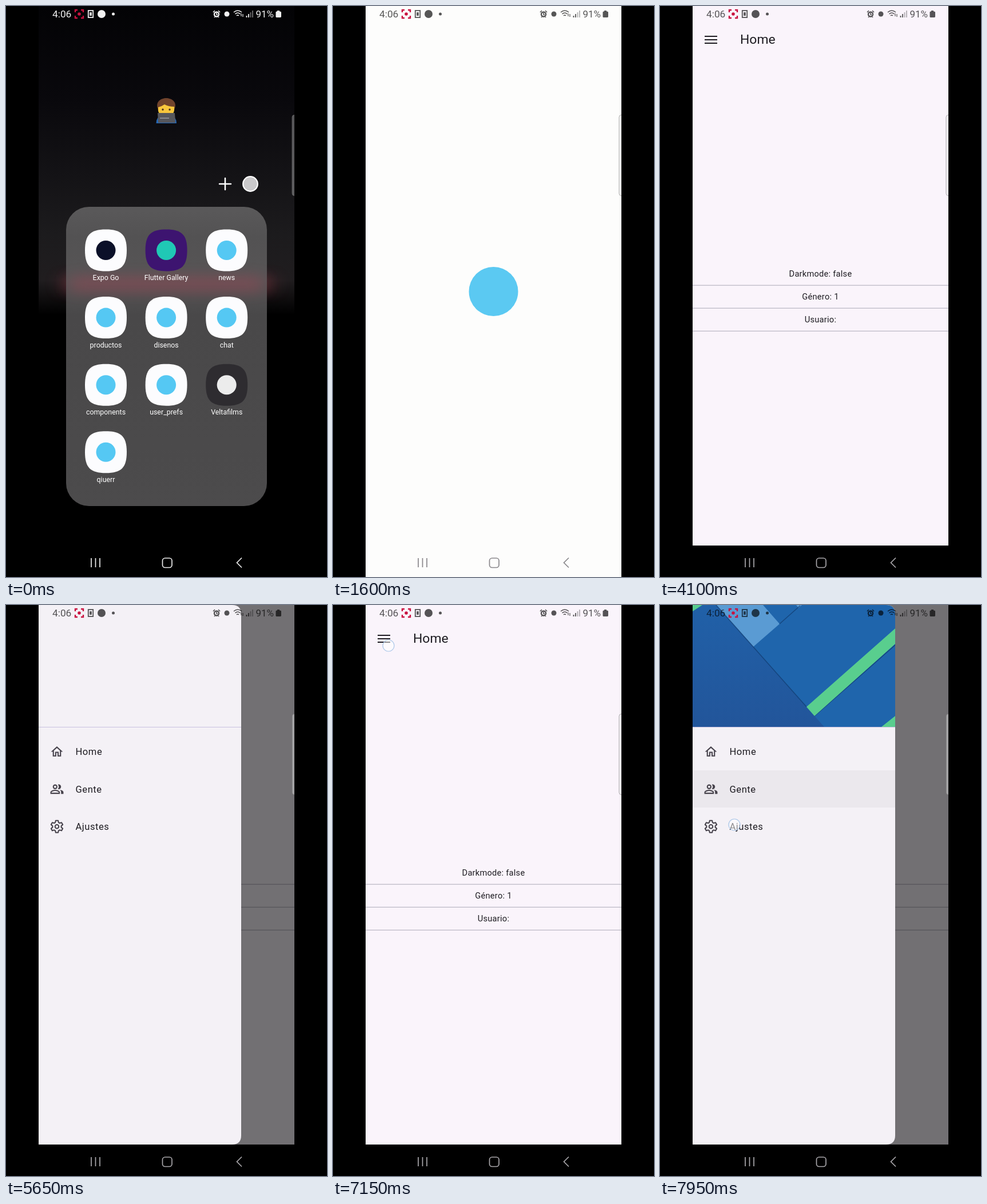
Animation, 561 px wide and 998 px high, one loop 8000 ms. Source, as an HTML page:

```html
<!DOCTYPE html>
<html lang="es">
<head>
<meta charset="utf-8">
<title>App preferences demo</title>
<style>
html, body { margin: 0; width: 100%; height: 100%; overflow: hidden; background: #000; }
svg { display: block; width: 561px; height: 998px; font-family: Roboto, "Noto Sans", sans-serif; }
.label { font-size: 12.4px; fill: #fff; text-anchor: middle; }
.body { font-size: 14.6px; letter-spacing: .26px; fill: #1e1c22; text-anchor: middle; }
.item { font-size: 16.6px; letter-spacing: .52px; fill: #1e1c22; }
.line { fill: none; stroke: currentColor; }
</style>
</head>
<body>
<svg viewBox="0 0 561 998">
  <defs>
    <clipPath id="phone"><rect x="57" width="447" height="998"/></clipPath>
    <clipPath id="header"><path d="M57 0H395Q411 0 411 16V213H57Z"/></clipPath>
    <filter id="soft" x="-20%" y="-150%" width="140%" height="400%">
      <feGaussianBlur stdDeviation="14 10"/>
    </filter>
    <linearGradient id="wall" x2="0" y2="1">
      <stop offset="0" stop-color="#030305"/>
      <stop offset=".16" stop-color="#09080c"/>
      <stop offset=".3" stop-color="#141316"/>
      <stop offset=".4" stop-color="#1c1b1d"/>
      <stop offset=".48" stop-color="#201d1f"/>
      <stop offset=".54" stop-color="#000"/>
    </linearGradient>
    <linearGradient id="panel" x2="0" y2="1">
      <stop offset="0" stop-color="#5a595a"/>
      <stop offset=".1" stop-color="#535253"/>
      <stop offset=".25" stop-color="#575556"/>
      <stop offset=".36" stop-color="#494849"/>
      <stop offset="1" stop-color="#4c4b4c"/>
    </linearGradient>
    <linearGradient id="blue" x2="0" y2="1">
      <stop offset="0" stop-color="#2063ab"/>
      <stop offset="1" stop-color="#22559a"/>
    </linearGradient>
    <path id="tile" d="M-36.5 0C-36.5-27-27-36.5 0-36.5S36.5-27 36.5 0 27 36.5 0 36.5-36.5 27-36.5 0Z"/>
  </defs>
  <g clip-path="url(#phone)">
    <g id="folder">
      <rect x="57" width="447" height="998" fill="url(#wall)"/>
      <rect x="95" y="470" width="375" height="32" fill="#8a3040" opacity=".3" filter="url(#soft)"/>
      <g transform="translate(280 183)">
        <path d="M-17.500 22Q-17.500 11-9 9H9Q18 11 18 22Z" fill="#2468b8"/>
        <path d="M-15-4C-19-16-9-22 0-22S19-16 15-4Z" fill="#70432c"/>
        <path d="M-14-6Q-7-8-3-11 4-7 14-7 16 9 0 11-16 9-14-6Z" fill="#f8c63c"/>
        <circle cx="-6" cy="-2" r="1.700" fill="#4a3020"/>
        <circle cx="6" cy="-2" r="1.700" fill="#4a3020"/>
        <path d="M-15 4H15L16 21H-14Z" fill="#56575c"/>
        <path d="M-11 13H5" stroke="#9a9ba0" stroke-width="1.500"/>
      </g>
      <path d="M383 301V321M373 311H393" stroke="#fff" stroke-width="2.500" stroke-linecap="round"/>
      <circle cx="427" cy="311" r="12.800" fill="#cac9cb" stroke="#fff" stroke-width="2.200"/>
      <rect x="105" y="351" width="351" height="523" rx="40" fill="url(#panel)"/>
      <rect x="112" y="470" width="337" height="32" fill="#9a4452" opacity=".42" filter="url(#soft)"/>
      <g id="apps"></g>
    </g>
    <g id="splash">
      <rect id="sheet" fill="#fdfdfc"/>
      <circle id="mark" fill="#5bc9f2"/>
    </g>
    <g id="home">
      <rect x="57" width="447" height="998" fill="#faf4fb"/>
      <path d="M78 53H100M78 59H100M78 65H100" stroke="#1e1c22" stroke-width="2.200"/>
      <text x="140" y="66" font-size="22.900" fill="#1e1c22">Home</text>
      <g id="rows"></g>
      <rect id="scrim" x="57" width="447" height="943"/>
      <g id="drawer">
        <path d="M57 0H395Q411 0 411 16V927Q411 943 395 943H57Z" fill="#f4f1f6"/>
        <path d="M57 213.500H411" stroke="#c8c0e0"/>
        <g id="picture" clip-path="url(#header)">
          <rect x="57" width="354" height="213" fill="#1f65ac"/>
          <path d="M57-47L98 0 270 194 287 213H57Z" fill="url(#blue)"/>
          <path d="M98 0H180L209 33 163 73Z" fill="#5a9bd3"/>
          <path d="M238 0H248L242 5Z" fill="#5a9bd3"/>
          <path d="M98 0L256 178M209 33L245 1M270 194L412 69" fill="none" stroke="#123e73" stroke-opacity=".75" stroke-width="1.600"/>
          <path d="M256 178L411 41V68L270 194ZM387 213L411 194V213ZM57 0H74L57 11Z" fill="#59ce8e"/>
        </g>
        <rect id="pressed" x="57" y="289" width="354" height="65" fill="#ebe8ed"/>
        <g id="items" color="#48444d"></g>
      </g>
      <rect x="57" y="943" width="447" height="55"/>
    </g>
    <rect id="handle" x="500" y="190.500" width="14" height="141" rx="4" fill="#fff" stroke="#777" stroke-opacity=".6"/>
    <g id="status" fill="currentColor">
      <text x="81" y="20" font-size="17.300">4:06</text>
      <g stroke="#c9123f" stroke-width="2.400" fill="none">
        <path d="M121 11V7H125M131 7H135V11M135 17V21H131M125 21H121V17"/>
      </g>
      <circle cx="128" cy="14" r="2.800" fill="#c9123f"/>
      <rect x="143.800" y="8" width="8.400" height="12" class="line" stroke-width="1.800"/>
      <rect x="146.200" y="11" width="3.600" height="6"/>
      <circle cx="167" cy="14" r="7"/>
      <circle cx="187.500" cy="14" r="2.500"/>
      <circle cx="368" cy="14.500" r="4" class="line" stroke-width="2.400"/>
      <path d="M362 11L365 8M374 11L371 8M364 20L365 19M372 20L371 19M368 12V15H370" class="line" stroke-width="1.600"/>
      <circle cx="386" cy="14" r="4.500"/>
      <path d="M398 11Q405 5 412 11M400.500 14Q405 10 409.500 14M403 17Q405 15 407 17" class="line" stroke-width="1.600"/>
      <path d="M411 18V13M414 14V19" class="line" stroke-width="1.200"/>
      <path d="M420.500 20V17M424 20V14" class="line" stroke-width="1.800"/>
      <path d="M427.500 20V11M431 20V8" class="line" stroke-width="1.800" opacity=".45"/>
      <text x="436.500" y="20" font-size="17">91%</text>
      <path d="M474 8H478V9.500H479Q481 9.500 481 11V18.500Q481 20 479 20H473Q471.500 20 471.500 18.500V11Q471.500 9.500 473 9.500H474Z"/>
    </g>
    <g id="chip">
      <circle r="11" fill="#58c563"/>
      <rect x="-2.200" y="-6.500" width="4.400" height="8.500" rx="2.200" fill="#fff"/>
      <path d="M-4.500-1Q-4.500 4 0 4T4.500-1M0 4V7" fill="none" stroke="#fff" stroke-width="1.300"/>
    </g>
    <g id="nav" class="line" stroke-width="1.700">
      <path d="M149 965V981M156.500 965V981M164 965V981"/>
      <rect x="273.500" y="965" width="16.500" height="16.500" rx="4.500"/>
      <path d="M412 964.500L403.500 973 412 981.500"/>
    </g>
    <circle id="touch" r="10" fill="#fff" fill-opacity=".5" stroke="#a9c6e8" stroke-width="1.200"/>
  </g>
</svg>
<script>
const LOOP = 8000, STEP = 50;
const $ = id => document.getElementById(id);
const set = (id, attrs) => {
  for (const k in attrs) $(id).setAttribute(k, attrs[k]);
};
const show = (id, on) => set(id, { visibility: on ? 'visible' : 'hidden' });
const mix = (a, b, p) => a + (b - a) * p;
const ramp = (t, from, to) => Math.min(1, Math.max(0, (t - from) / (to - from)));
const easeOut = p => 1 - (1 - p) ** 3;
const easeInOut = p => p * p * (3 - 2 * p);

const SKY = '#55c8f3';
const apps = [
  ['Expo Go', '#0b1029'], ['Flutter Gallery', '#20c8b5', '#3d1470'], ['news', SKY],
  ['productos', SKY], ['disenos', SKY], ['chat', SKY],
  ['components', SKY], ['user_prefs', SKY], ['Veltafilms', '#ececec', '#2e2c30'],
  ['qiuerr', SKY]
];
$('apps').innerHTML = apps.map(([name, color, tile = '#fcfcfe'], i) => {
  const x = 174.5 + i % 3 * 105.6, y = 427 + Math.floor(i / 3) * 117.6;
  return `<g transform="translate(${x} ${y})"><use href="#tile" fill="${tile}"/>
    <circle r="17" fill="${color}"/><text class="label" y="52">${name}</text></g>`;
}).join('');

$('rows').innerHTML = ['Darkmode: false', 'Género: 1', 'Usuario:'].map((text, i) => {
  const y = 473 + i * 40;
  return `<text class="body" x="280.5" y="${y}">${text}</text>
    <path d="M57 ${y + 15.3}H504" stroke="#c5c2cd" stroke-width="1.4"/>`;
}).join('');

function gear() {
  const points = [];
  for (let i = 0; i < 6; i++) {
    for (const [turn, r] of [[-.38, 7.4], [-.2, 10.3], [.2, 10.3], [.38, 7.4]]) {
      const a = i * Math.PI / 3 + turn;
      points.push([12 + r * Math.sin(a), 12 - r * Math.cos(a)].map(v => v.toFixed(2)));
    }
  }
  return `<g class="line" stroke-width="2" stroke-linejoin="round">
    <polygon points="${points.join(' ')}"/><circle cx="12" cy="12" r="3.1"/></g>`;
}
const house = '<path d="M12 5.69l5 4.5V18h-2v-6H9v6H7v-7.81l5-4.5M12 3L2 12h3v8h6v-6h2v6h6v-8h3z"/>';
const people = `<path d="M16.67 13.13C18.04 14.06 19 15.32 19 17v3h4v-3c0-2.18-3.57-3.47-6.33-3.87z
  M15 12a4 4 0 0 0 0-8c-.47 0-.91.1-1.33.24a6 6 0 0 1 0 7.52c.42.14.86.24 1.33.24z"/>
  <g class="line" stroke-width="2"><circle cx="9" cy="8" r="3"/>
  <path d="M2 19V17C2 15.500 6 14 9 14S16 15.500 16 17V19Z"/></g>`;
$('items').innerHTML = [['Home', house], ['Gente', people], ['Ajustes', gear()]].map(([name, icon], i) => {
  const y = 256.5 + i * 65.4;
  return `<g fill="currentColor" transform="translate(76.500 ${y - 12.5}) scale(1.04)">${icon}</g>
    <text class="item" x="121.500" y="${y + 5.7}">${name}</text>`;
}).join('');

// start, end, from x, from y, to x, to y
const touches = [
  [900, 1050, 303, 664, 303, 664],
  [5300, 5450, 95.5, 54.5, 95.5, 54.5],
  [7100, 7250, 97, 71, 97, 71],
  [7800, 8000, 130, 330, 130, 384]
];

function drawerAt(t) {
  if (t < 5650) return 0;
  if (t < 7000) return 1 - easeInOut(ramp(t, 6150, 6450));
  return easeOut(ramp(t, 7200, 7500));
}

function drawLaunch(t) {
  const p = easeOut(ramp(t, 1050, 1500));
  const y = mix(626, 0, p), w = mix(73, 447, p), h = mix(73, 998, p);
  show('splash', t >= 1100 && t < 3500);
  set('sheet', { x: mix(244, 57, p), y, width: w, height: h, rx: mix(28, 0, p) });
  set('mark', { cx: 280.5, cy: y + h / 2, r: mix(17, 43, p) });
  show('folder', t < 1500);
  set('folder', { opacity: 1 - ramp(t, 1100, 1450) * .8 });
}

function drawHome(t) {
  const open = drawerAt(t);
  show('home', t >= 3350);
  set('home', { opacity: ramp(t, 3300, 3500) });
  set('scrim', { opacity: open * .54 });
  set('drawer', { transform: `translate(${-354 * (1 - open)} 0)` });
  set('picture', { opacity: t >= 5750 ? 1 : 0 });
  set('pressed', { opacity: t >= 7850 ? 1 : 0 });
}

function drawSystem(t) {
  const light = t >= 1400;
  set('status', {
    color: light ? 'rgba(0,0,0,.66)' : '#f2f2f2',
    opacity: t < 1550 ? 1 - ramp(t, 50, 200) : 1
  });
  show('chip', t >= 150 && t < 1550);
  set('chip', { transform: `translate(473.500 12) scale(${easeOut(ramp(t, 100, 350))})` });
  set('nav', { color: !light ? '#ededed' : t < 3400 ? '#89878b' : '#aaa8ac' });
  set('handle', { 'fill-opacity': light ? .35 : .3 });
}

function drawTouch(t) {
  const hit = touches.find(([from, to]) => t >= from && t < to);
  show('touch', hit);
  if (!hit) return;
  const [from, to, x0, y0, x1, y1] = hit;
  const p = ramp(t, from, to - STEP);
  set('touch', { cx: mix(x0, x1, p), cy: mix(y0, y1, p) });
}

const start = performance.now();
function frame() {
  const now = Math.max(0, performance.now() - start) % LOOP;
  const t = Math.floor(now / STEP) * STEP;
  drawLaunch(t);
  drawHome(t);
  drawSystem(t);
  drawTouch(t);
  requestAnimationFrame(frame);
}
frame();
</script>
</body>
</html>
```
